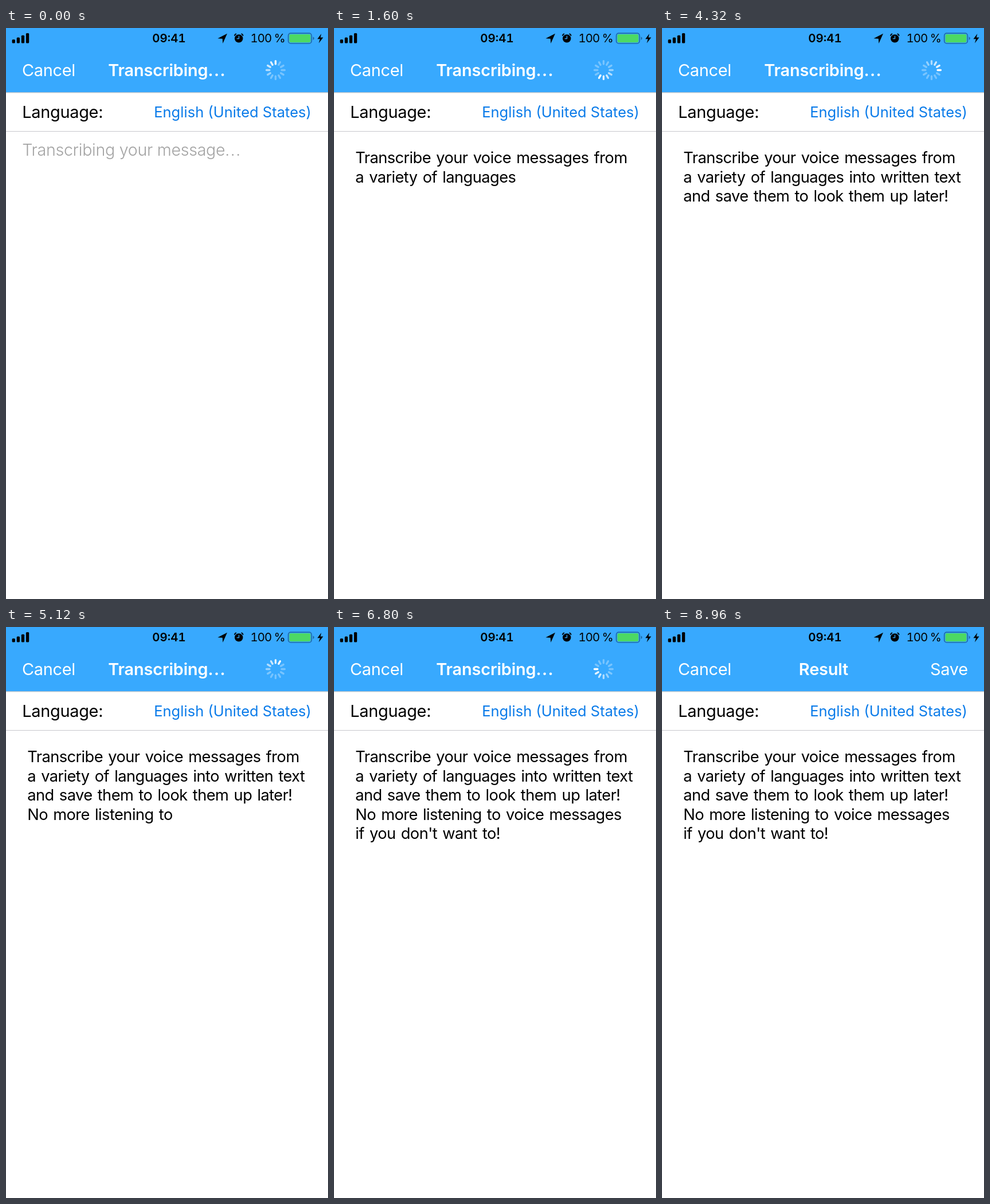
These frames come from a looping animation (562 px wide and 997 px high, 9000 ms). An HTML page:

```html
<!DOCTYPE html>
<html lang="en">
<head>
<meta charset="utf-8">
<title>Transcription</title>
<style>
  html, body { margin: 0; width: 100%; height: 100%; overflow: hidden; background: #fff; }
  svg { display: block; width: 100%; height: 100%; }
  text { font-family: Inter, "Liberation Sans", sans-serif; font-optical-sizing: none; white-space: pre; }
  .nav { font-size: 28.96px; letter-spacing: -.32px; }
  .title { font-weight: 600; text-anchor: middle; letter-spacing: -.2px; }
  .hint { font-size: 28.7px; font-weight: 300; letter-spacing: -.33px; fill: #a3a3a3; }
  .dots { letter-spacing: 1.3px; }
  .body { font-size: 27.3px; letter-spacing: -.58px; word-spacing: 2.1px; }
  .status { font-size: 20.44px; font-variant-numeric: tabular-nums; }
  .charge { letter-spacing: -1px; }
</style>
</head>
<body>
<svg viewBox="0 0 562 997" preserveAspectRatio="none">
  <rect width="562" height="997" fill="#fff"/>
  <rect width="562" height="112.4" fill="#38a9fe"/>
  <path d="M0 112.85H562" stroke="#b2b2b2" stroke-width=".88"/>
  <path d="M0 180.5H562" stroke="#c8c7cc"/>

  <g id="signal"></g>
  <text class="status" x="284.5" y="25.4" font-weight="600" text-anchor="middle">09:41</text>
  <path d="M386 9.8L369.5 18.2L377.8 18.8L378.4 27Z"/>
  <g fill="none" stroke="#000" stroke-width="1.8" stroke-linecap="round">
    <path d="M399 13Q399.4 11 401.4 10.4M413.6 13Q413.2 11 411.2 10.4"/>
    <circle cx="406.3" cy="18.4" r="7.2" fill="#000" stroke="none"/>
    <path d="M406.5 14.2V18.6H403.2" stroke="#38a9fe" stroke-width="1.4"/>
  </g>
  <text class="status charge" x="426.6" y="25.4">100 %</text>
  <rect x="492.7" y="9.2" width="40.6" height="17.8" rx="4.2" fill="none" stroke="#216ca6" stroke-width="1.7"/>
  <rect x="494.6" y="11" width="36.8" height="14.2" rx="2.4" fill="#4cd964"/>
  <path d="M535.6 15.2Q538 16 538 18.1T535.6 21Z" fill="#216ca6"/>
  <path d="M550.4 10L543.4 19.2H548L545.9 26.4L553.6 16.6H548.8Z"/>

  <g fill="#fff">
    <text class="nav" x="28" y="84.3">Cancel</text>
    <text class="nav title" id="busyTitle" x="281.2" y="84.3">Transcribing<tspan class="dots">...</tspan></text>
    <text class="nav title" id="doneTitle" x="282" y="84.3">Result</text>
    <text class="nav" id="save" x="533.8" y="84.3" text-anchor="end">Save</text>
  </g>
  <g id="spinner" transform="translate(470.5 73.5)" stroke="#fff" stroke-width="3.3" stroke-linecap="round"></g>

  <text class="nav" x="28.2" y="157.3">Language:</text>
  <text x="532.9" y="156.3" font-size="25.55" text-anchor="end" fill="#0a7be9">English (United States)</text>
  <text class="hint" id="hint" x="28.2" y="223">Transcribing your message<tspan class="dots">...</tspan></text>
  <g id="lines"></g>
</svg>
<script>
const LOOP = 9000, DONE_AT = 7500, SPOKES = 12;
const byId = id => document.getElementById(id);

function add(parent, tag, attrs) {
  const node = document.createElementNS("http://www.w3.org/2000/svg", tag);
  for (const key in attrs) node.setAttribute(key, attrs[key]);
  return byId(parent).appendChild(node);
}

// Each entry: time, line, words heard. "=" replaces what the line held.
const speech = [
  [440, 0, "Transcribe"], [680, 0, "your"], [840, 0, "voice"], [1040, 0, "messages"], [1160, 0, "from"],
  [1240, 1, "a"], [1320, 1, "variety"], [1440, 1, "of"], [1560, 1, "languages"],
  [1920, 1, "into"], [2160, 1, "written"], [2400, 1, "text"],
  [2640, 2, "and"], [2800, 2, "see"], [2920, 2, "if"],
  [3160, 2, "=and save them"], [3280, 2, "to"], [3400, 2, "look"], [3520, 2, "them"], [3640, 2, "up"],
  [3920, 2, "later!"],
  [4360, 3, "No"], [4440, 3, "more"], [4560, 3, "listening"], [4840, 3, "to"],
  [5400, 3, "voice"], [5680, 3, "messages"],
  [6520, 4, "if"], [6600, 4, "you don't"], [6680, 4, "want"], [6760, 4, "to!"]
];

[6.4, 10, 13.7, 17.4].forEach((height, i) =>
  add("signal", "rect", { x: 10.6 + i * 8.1, y: 26.5 - height, width: 5.3, height, rx: 1.5 }));

const spokes = Array.from({ length: SPOKES }, (_, i) =>
  add("spinner", "path", { d: "M0 -10.6V-15.9", transform: `rotate(${i * 360 / SPOKES})` }));

const lines = Array.from({ length: 5 }, (_, i) =>
  add("lines", "text", { class: "body", x: 37.2, y: 236.2 + i * 33.55 }));

function linesAt(time) {
  const result = lines.map(() => "");
  for (const [start, row, words] of speech) {
    if (start > time) break;
    if (words[0] === "=") result[row] = words.slice(1);
    else result[row] += (result[row] && " ") + words;
  }
  return result;
}

const show = (id, visible) => byId(id).setAttribute("visibility", visible ? "visible" : "hidden");

function render(time) {
  const done = time >= DONE_AT;
  show("busyTitle", !done);
  show("spinner", !done);
  show("doneTitle", done);
  show("save", done);
  show("hint", time < speech[0][0]);

  const head = Math.floor(time % 1000 / 1000 * SPOKES);
  spokes.forEach((spoke, i) => {
    const age = (head - i + SPOKES) % SPOKES;
    spoke.setAttribute("opacity", Math.max(.32, 1 - age * .13));
  });
  linesAt(time).forEach((text, i) => {
    if (lines[i].textContent !== text) lines[i].textContent = text;
  });
}

const begin = performance.now();
function tick() {
  render((performance.now() - begin) % LOOP);
  requestAnimationFrame(tick);
}
tick();
</script>
</body>
</html>
```
